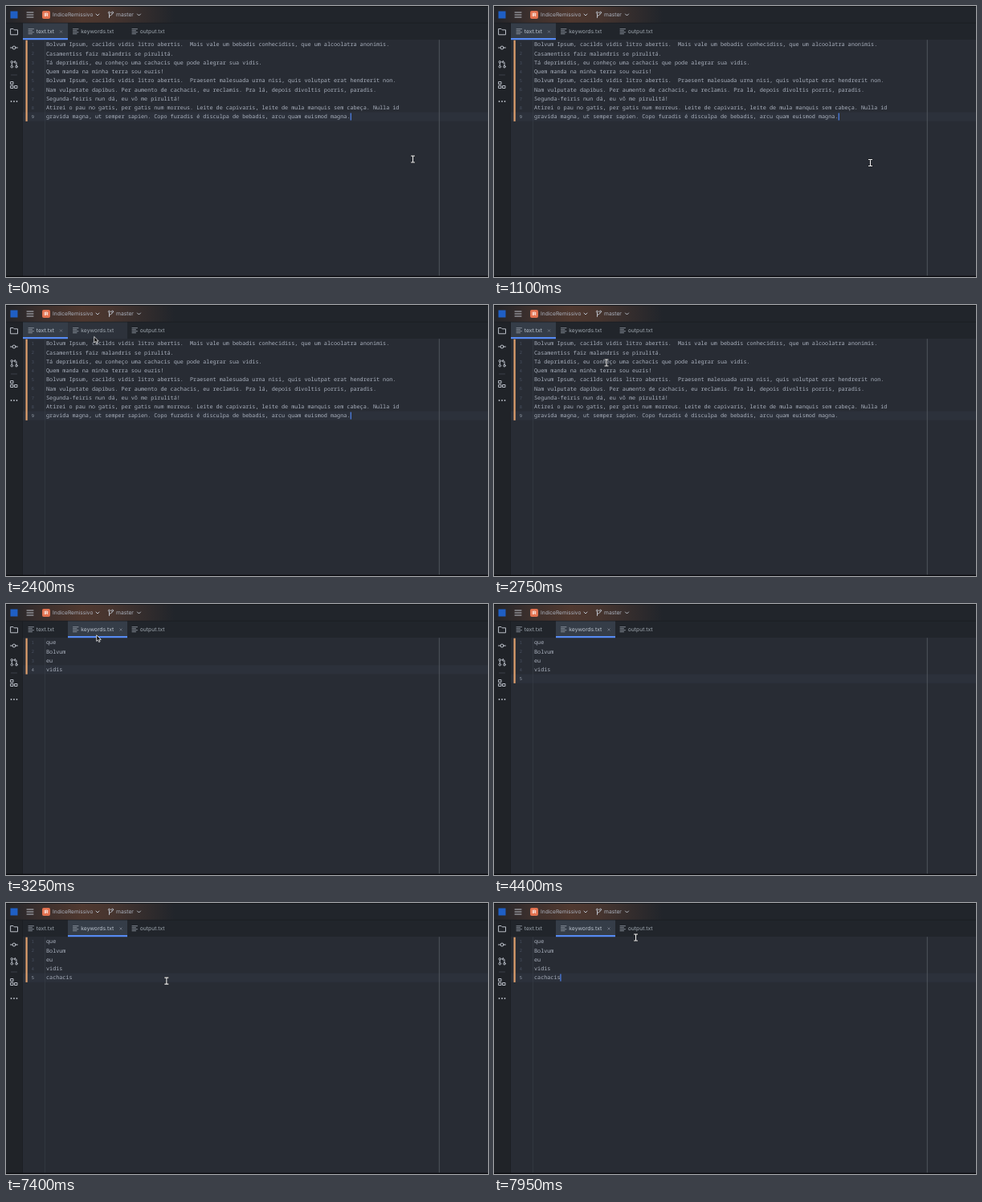
Write an HTML page that moves like this. It is 600 by 338 pixels and loops after 8 s.

```html
<!DOCTYPE html>
<html lang="pt">
<head>
<meta charset="utf-8">
<title>Editor</title>
<style>
html, body { margin: 0; width: 100%; height: 100%; overflow: hidden; background: #282c34; }
svg { display: block; width: 100%; height: 100%; }
text { text-rendering: geometricPrecision; white-space: pre; }
.ui { font: 6.75px Inter, sans-serif; fill: #abb2bf; }
.code { font: 6.79px "Noto Sans Mono", monospace; fill: #abb2bf; }
.num { font: 5.4px "Noto Sans Mono", monospace; fill: #495162; text-anchor: end; }
.line { fill: none; stroke: #b9bec7; stroke-width: 1; stroke-linecap: round; stroke-linejoin: round; }
</style>
</head>
<body>
<svg viewBox="0 0 600 338" preserveAspectRatio="none">
  <defs>
    <linearGradient id="glow">
      <stop offset="0" stop-color="#23252a"/>
      <stop offset=".22" stop-color="#3d302d"/>
      <stop offset=".45" stop-color="#4f382f"/>
      <stop offset=".62" stop-color="#47352f"/>
      <stop offset="1" stop-color="#21252b"/>
    </linearGradient>
  </defs>

  <rect width="600" height="338" fill="#282c34"/>
  <rect width="600" height="42" fill="#21252b"/>
  <rect width="210" height="21" fill="url(#glow)"/>
  <rect width="600" height="1" fill="#15171b"/>
  <rect y="21" width="20.5" height="317" fill="#202328"/>
  <path d="M0 21.2H600M20.5 21V337" stroke="#1b1e23" stroke-width=".8"/>

  <rect x="5.5" y="6.5" width="9" height="9" fill="#1f5fc4"/>
  <path class="line" d="M26 8h8M26 11h8M26 14h8" stroke-linecap="butt"/>
  <rect x="45" y="6" width="10" height="10" rx="2" fill="#e2714f"/>
  <text x="50" y="13.3" text-anchor="middle" style="font:600 6px Inter,sans-serif" fill="#fff">IR</text>
  <text class="ui" x="58" y="13.4" style="font-size:6.6px">IndiceRemissivo</text>
  <text class="ui" x="137" y="13.4">master</text>
  <g class="line" stroke-width=".9">
    <path d="M112 10l2 2 2-2M163.500 10l2 2 2-2"/>
    <path d="M128.500 9.500v5M128.500 13c0-2 4-1 4-3.500"/>
    <circle cx="128.500" cy="8.300" r="1.100"/><circle cx="132.500" cy="8.300" r="1.100"/>
  </g>

  <g class="line">
    <path d="M6 28.500h3l1.200 1.300h4.300v6H6z"/>
    <path d="M5.500 52h2.500M12 52h2.500"/><circle cx="10" cy="52" r="2"/>
    <circle cx="7.300" cy="69.800" r="1.300"/><circle cx="7.300" cy="75.700" r="1.300"/><circle cx="13" cy="75.700" r="1.300"/>
    <path d="M7.300 71.200v3M13 74.300v-3.500q0-1-1-1h-1.600M11.500 68.300l-1.500 1.500 1.500 1.500"/>
    <path d="M6.500 86h7" stroke="#3a3f48" style="stroke:#3a3f48"/>
    <rect x="6" y="94.500" width="3" height="3"/><rect x="6" y="99.500" width="3" height="3"/><rect x="11" y="99.500" width="3" height="3"/>
  </g>
  <g fill="#b9bec7">
    <circle cx="6.500" cy="119" r=".9"/><circle cx="10" cy="119" r=".9"/><circle cx="13.500" cy="119" r=".9"/>
  </g>

  <rect id="hover" x="77" y="21.500" width="74" height="20.500" fill="#2d323b"/>
  <rect id="tabBg" y="21.500" height="20.500" fill="#353d48"/>
  <rect id="tabBar" y="40" height="2.200" fill="#568af2"/>
  <g id="tabs"></g>
  <path id="close" d="M-1.500-1.500l3 3m0-3l-3 3" stroke="#7b828e" stroke-width=".7"/>

  <rect id="row" x="21" width="579" height="11.200" fill="#2c313b"/>
  <path d="M48.500 42.200V336.500" stroke="#353a44" stroke-width=".8"/>
  <path d="M539.300 42.200V336.500" stroke="#555a63" stroke-width=".9"/>
  <rect id="change" x="24.500" y="42.700" width="2.200" fill="#dfa06d"/>
  <g id="nums"></g>
  <g id="page0"></g>
  <g id="page1"></g>
  <rect id="caret" width="1.100" height="9" fill="#528bff"/>
  <rect y="336.600" width="600" height="1.400" fill="#0b0c0f"/>

  <g id="beam" fill="none" stroke-linecap="square">
    <path d="M-2-4h1.500l.5.500.5-.5H2M0-3.500v7M-2 4h1.500l.5-.500.5.500H2" stroke="#17191d" stroke-width="2"/>
    <path d="M-2-4h1.500l.5.500.5-.5H2M0-3.500v7M-2 4h1.500l.5-.500.5.500H2" stroke="#f2f2f2" stroke-width="1.100"/>
  </g>
  <path id="arrow" d="M0 0v7.600l1.800-1.600 1.200 2.700 1.400-.6-1.200-2.600h2.400z" fill="#111" stroke="#f2f2f2" stroke-width=".8"/>
</svg>
<script>
const LOOP = 8000, STEP = 50;
const CHAR = 4.074, LEFT = 50, PITCH = 11.24, FIRST = 42.6;
const OPEN_TAB = 3250, ENTER = 4400;

const prose = [
  'Bolvum Ipsum, cacilds vidis litro abertis.  Mais vale um bebadis conhecidiss, que um alcoolatra anonimis.',
  'Casamentiss faiz malandris se pirulitá.',
  'Tá deprimidis, eu conheço uma cachacis que pode alegrar sua vidis.',
  'Quem manda na minha terra sou euzis!',
  'Bolvum Ipsum, cacilds vidis litro abertis.  Praesent malesuada urna nisi, quis volutpat erat hendrerit non.',
  'Nam vulputate dapibus. Per aumento de cachacis, eu reclamis. Pra lá, depois divoltis porris, paradis.',
  'Segunda-feiris nun dá, eu vô me pirulitá!',
  'Atirei o pau no gatis, per gatis num morreus. Leite de capivaris, leite de mula manquis sem cabeça. Nulla id',
  'gravida magna, ut semper sapien. Copo furadis é disculpa de bebadis, arcu quam euismod magna.'
];
const keywords = ['que', 'Bolvum', 'eu', 'vidis', ''];
const word = 'cachacis';
const keyTimes = [4700, 4900, 5200, 5350, 5500, 6000, 6100, 6200];
const blinks = [450, 950, 1450, 1950, 2450, 2950, 3250, 3750, 4250, 6800, 7350, 7850];
const tabs = [
  { name: 'text.txt', x: 21, w: 56, icon: 28 },
  { name: 'keywords.txt', x: 77, w: 74, icon: 83.5 },
  { name: 'output.txt', x: 151, w: 60, icon: 157 }
];
// time, x, y
const moves = [
  [0, 506.5, 191], [950, 506.5, 191], [1050, 503, 202], [1250, 330, 140],
  [1450, 116, 66], [1550, 115, 67], [1650, 141, 89], [1750, 137, 64],
  [1850, 122, 39], [2050, 116, 36], [2350, 116, 36], [2500, 82, 55],
  [2600, 60, 70], [2750, 140, 72], [2900, 152, 66], [3050, 126, 49],
  [3200, 112.7, 38.8], [4100, 112.7, 38.8], [4350, 187, 101], [4400, 200.5, 101.5],
  [7300, 200.5, 101.5], [7550, 196, 82], [7800, 181, 50], [7950, 176.5, 43], [8000, 176.5, 43]
];

const $ = id => document.getElementById(id);
const set = (el, attrs) => { for (const k in attrs) el.setAttribute(k, attrs[k]); };
const show = (el, on) => { el.style.display = on ? '' : 'none'; };

function add(parent, tag, attrs, content = '') {
  const el = document.createElementNS('http://www.w3.org/2000/svg', tag);
  set(el, attrs);
  el.textContent = content;
  return parent.appendChild(el);
}

const rowTop = i => FIRST + i * PITCH;
const addLines = (page, lines) => lines.map((s, i) =>
  add(page, 'text', { class: 'code', x: LEFT, y: rowTop(i) + 7.8 }, s));

addLines($('page0'), prose);
const typed = addLines($('page1'), keywords)[4];
const nums = prose.map((_, i) =>
  add($('nums'), 'text', { class: 'num', x: 35, y: rowTop(i) + 7.6 }, i + 1));
const labels = tabs.map(t => {
  const x = t.icon;
  add($('tabs'), 'path', {
    class: 'line', 'stroke-linecap': 'butt',
    d: `M${x} 28.700h6.500M${x} 30.700h4.500M${x} 32.700h6.500M${x} 34.700h4.500`,
    style: 'stroke-width:.8;stroke:#9aa1ad'
  });
  return add($('tabs'), 'text', { class: 'ui', x: x + 9.8, y: 34.4 }, t.name);
});

function mouseAt(t) {
  const i = moves.findIndex((m, k) => k + 1 < moves.length && t < moves[k + 1][0]);
  const a = moves[i], b = moves[i + 1];
  const p = moves[i - 1] || a, n = moves[i + 2] || b;
  const span = b[0] - a[0], u = (t - a[0]) / span;
  const slope = (from, mid, to, k) => {
    const before = mid[k] - from[k], after = to[k] - mid[k];
    return before * after > 0 ? (to[k] - from[k]) / (to[0] - from[0]) * span : 0;
  };
  return [1, 2].map(k => {
    const s = slope(p, a, b, k), e = slope(a, b, n, k), d = b[k] - a[k];
    return a[k] + u * (s + u * (3 * d - 2 * s - e + u * (s + e - 2 * d)));
  });
}

function render(t) {
  const tab = t < OPEN_TAB ? 0 : 1;
  const rows = tab ? (t < ENTER ? 4 : 5) : prose.length;
  const text = word.slice(0, keyTimes.filter(k => t >= k).length);
  const current = tab ? (rows === 5 ? text : keywords[3]) : prose[8];

  show($('page0'), !tab);
  show($('page1'), tab);
  typed.textContent = text;
  nums.forEach((n, i) => {
    show(n, i < rows);
    n.style.fill = i === rows - 1 ? '#9aa2af' : '';
  });
  set($('row'), { y: rowTop(rows - 1) });
  set($('change'), { height: rows * PITCH });

  set($('tabBg'), { x: tabs[tab].x, width: tabs[tab].w });
  set($('tabBar'), { x: tabs[tab].x, width: tabs[tab].w });
  set($('close'), { transform: `translate(${tab ? 143 : 68.5} 32)` });
  labels.forEach((l, i) => { l.style.fill = i === tab ? '#bcc5d0' : '#a0a9b1'; });

  set($('caret'), { x: LEFT - 0.2 + current.length * CHAR, y: rowTop(rows - 1) + 1 });
  show($('caret'), blinks.filter(b => t >= b).length % 2 === 0);

  const [x, y] = mouseAt(t);
  const visible = t < ENTER || t >= 6950;
  const overTabs = y < 42;
  show($('beam'), visible && !overTabs);
  show($('arrow'), visible && overTabs);
  set($('beam'), { transform: `translate(${x} ${y})` });
  set($('arrow'), { transform: `translate(${x} ${y})` });
  show($('hover'), !tab && overTabs && x > 77 && x < 151);
}

function frame() {
  const t = performance.now() % LOOP;
  render(Math.floor(t / STEP) * STEP);
  requestAnimationFrame(frame);
}
frame();
</script>
</body>
</html>
```
